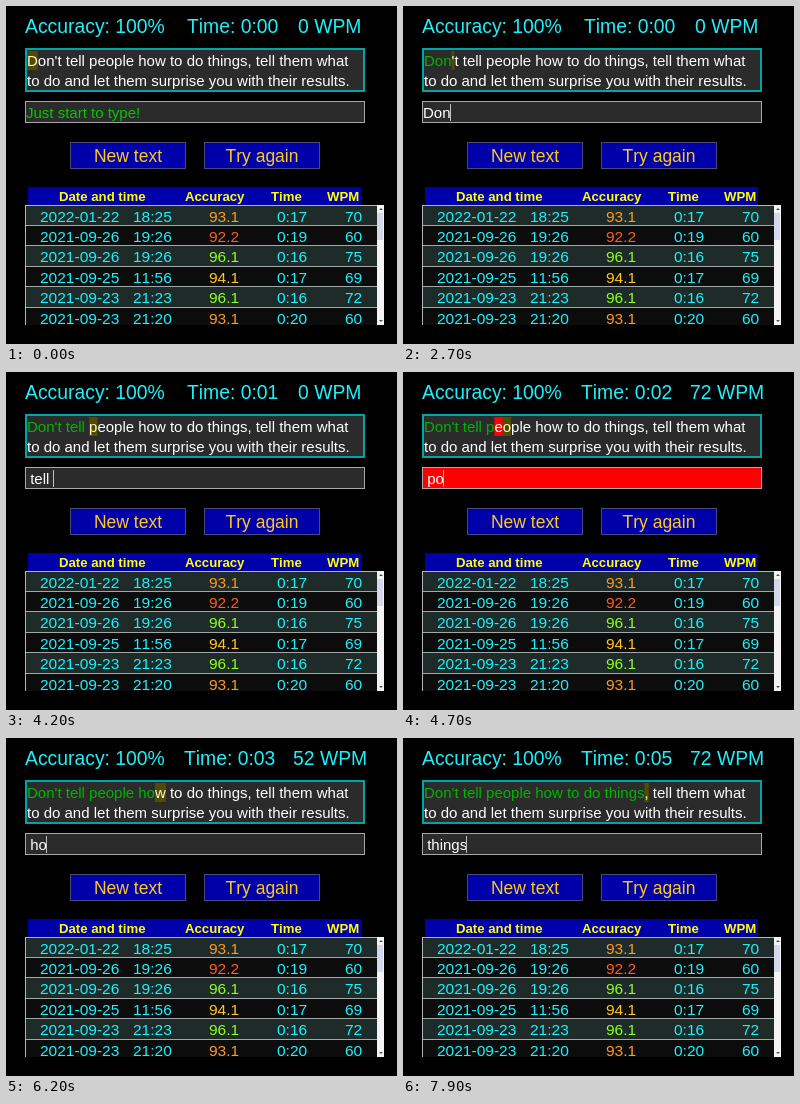
Animation, 391 px wide and 338 px high, one loop 8 s. Source, as an HTML page with a canvas:

```html
<!DOCTYPE html>
<html lang="en">
<head>
<meta charset="utf-8">
<title>Typing trainer</title>
<style>
  html, body { margin: 0; width: 100%; height: 100%; overflow: hidden; background: #000; }
  canvas { display: block; }
</style>
</head>
<body>
<canvas id="stage" width="391" height="338"></canvas>
<script>
const ctx = document.getElementById('stage').getContext('2d');
const LOOP = 8000, STEP = 100;
const TYPING_START = 2000, TIMER_START = 2300;
const ERROR_START = 4700, ERROR_END = 5000;
const CYAN = '#1ef0fa', BLUE = '#0000aa';

const LINES = [
  "Don't tell people how to do things, tell them what",
  'to do and let them surprise you with their results.'
];
const PROMPT = 'Just start to type!';

// [time, number of characters typed]
const PACE = [
  [2000, 1], [2700, 3], [4200, 11], [4300, 12], [4700, 13], [4999, 13], [5000, 12],
  [5200, 13], [5600, 15], [6300, 21], [6700, 26], [7300, 30], [7900, 34]
];

const RESULTS = [
  ['2022-01-22', '18:25', '93.1', '0:17', '70'],
  ['2021-09-26', '19:26', '92.2', '0:19', '60'],
  ['2021-09-26', '19:26', '96.1', '0:16', '75'],
  ['2021-09-25', '11:56', '94.1', '0:17', '69'],
  ['2021-09-23', '21:23', '96.1', '0:16', '72'],
  ['2021-09-23', '21:20', '93.1', '0:20', '60']
];
const COLUMNS = [34, 127, 203, 271, 339];
const SCORE_COLORS = { 92: '#ff5c1e', 93: '#ff9a1e', 94: '#ffc81e', 96: '#8cff1e' };

function box(x, y, w, h, fill, border, line = 1) {
  if (border) {
    ctx.fillStyle = border;
    ctx.fillRect(x, y, w, h);
    x += line; y += line; w -= 2 * line; h -= 2 * line;
  }
  ctx.fillStyle = fill;
  ctx.fillRect(x, y, w, h);
}

function setFont(size, weight = '') {
  ctx.font = `${weight} ${size}px "Liberation Sans", Arial, sans-serif`;
  ctx.fontKerning = 'none';
}

function text(str, x, y, color) {
  ctx.fillStyle = color;
  ctx.fillText(str, x, y);
}

function typedCount(t) {
  if (t < TYPING_START) return 0;
  const i = PACE.findIndex(([time]) => time > t);
  if (i < 0) return PACE[PACE.length - 1][1];
  const [t0, n0] = PACE[i - 1], [t1, n1] = PACE[i];
  return Math.floor(n0 + (n1 - n0) * (t - t0) / (t1 - t0) + 1e-6);
}

function drawStatus(t) {
  const seconds = Math.max(0, Math.floor((t - TIMER_START) / 1000));
  // Speed is refreshed once per second, from the second tick on
  const wpm = seconds < 2 ? 0
    : Math.round(typedCount(TIMER_START + seconds * 1000) * 12 / seconds);
  setFont(19.35);
  text('Accuracy: 100%', 19, 27, CYAN);
  text('Time: 0:0' + seconds, wpm ? 178 : 181, 27, CYAN);
  text(wpm + ' WPM', wpm ? 287 : 292, 27, CYAN);
}

function drawPassage(count, wrong) {
  box(19, 42, 340, 44, '#2b2b2b', '#00a5a5', 2);
  setFont(15);
  const [first, second] = LINES;
  const at = n => 21 + ctx.measureText(first.slice(0, n)).width;
  const mark = (n, fill, color) => {
    box(at(n), 45, at(n + 1) - at(n), 19, fill);
    text(first[n], at(n), 60, color);
  };
  const good = count - wrong;
  text(first.slice(0, good), 21, 60, '#00b400');
  if (wrong) mark(good, '#ff0000', '#fff');
  mark(count, '#544a08', '#fff8c0');
  text(first.slice(count + 1), at(count + 1), 60, '#fff');
  text(second, 21, 80, '#fff');
}

function drawEntry(t, count, wrong) {
  box(19, 95, 340, 22, wrong ? '#ff0000' : '#2b2b2b', '#a8a8a8');
  setFont(15);
  const typed = wrong ? LINES[0].slice(0, count - 1) + 'o' : LINES[0].slice(0, count);
  const entry = count ? typed.match(/ ?[^ ]* ?$/)[0] : PROMPT;
  text(entry, 20, 112, count ? '#fff' : '#00c800');
  const caretOn = count || (t + 300) % 1000 < 500 && t >= 700;
  if (caretOn) box(Math.floor(19.5 + ctx.measureText(entry).width), 98, 1, 17, '#c0c0c0');
}

function drawButton(label, x) {
  box(x, 136, 116, 27, BLUE, '#4a4a78');
  setFont(17.5);
  ctx.textAlign = 'center';
  text(label, x + 58, 156, '#ffc81e');
  ctx.textAlign = 'left';
}

function drawTable() {
  box(22, 181, 333, 18, BLUE);
  setFont(13.2, 'bold');
  [['Date and time', 53], ['Accuracy', 179], ['Time', 265], ['WPM', 321]]
    .forEach(([label, x]) => text(label, x, 195, '#ffff00'));

  box(19, 199, 359, 120, '#0c0c0c', '#b4b4b4');
  setFont(15.5);
  RESULTS.forEach((row, i) => {
    const y = Math.floor(199 + i * 20.4);
    box(20, y + 1, 352, i < 5 ? 20 : 17, i % 2 ? '#0c0c0c' : '#1e2b28');
    if (i) box(20, y, 352, 1, '#a0a8a8');
    row.forEach((cell, c) =>
      text(cell, COLUMNS[c], y + 17, c === 2 ? SCORE_COLORS[parseInt(cell)] : CYAN));
  });

  box(371, 199, 7, 120, '#f4f4f4');
  box(371, 207, 6, 27, '#d4d8ea');
  for (const [y, tip] of [[204, 202], [314, 316]]) {
    ctx.fillStyle = '#505050';
    ctx.beginPath();
    ctx.moveTo(373, y);
    ctx.lineTo(375, tip);
    ctx.lineTo(377, y);
    ctx.fill();
  }
}

function frame(now) {
  const t = Math.floor(now % LOOP / STEP) * STEP;
  const count = typedCount(t);
  const wrong = t >= ERROR_START && t < ERROR_END ? 1 : 0;
  box(0, 0, 391, 338, '#000');
  drawStatus(t);
  drawPassage(count, wrong);
  drawEntry(t, count, wrong);
  drawButton('New text', 64);
  drawButton('Try again', 198);
  drawTable();
  requestAnimationFrame(frame);
}
requestAnimationFrame(frame);
</script>
</body>
</html>
```
